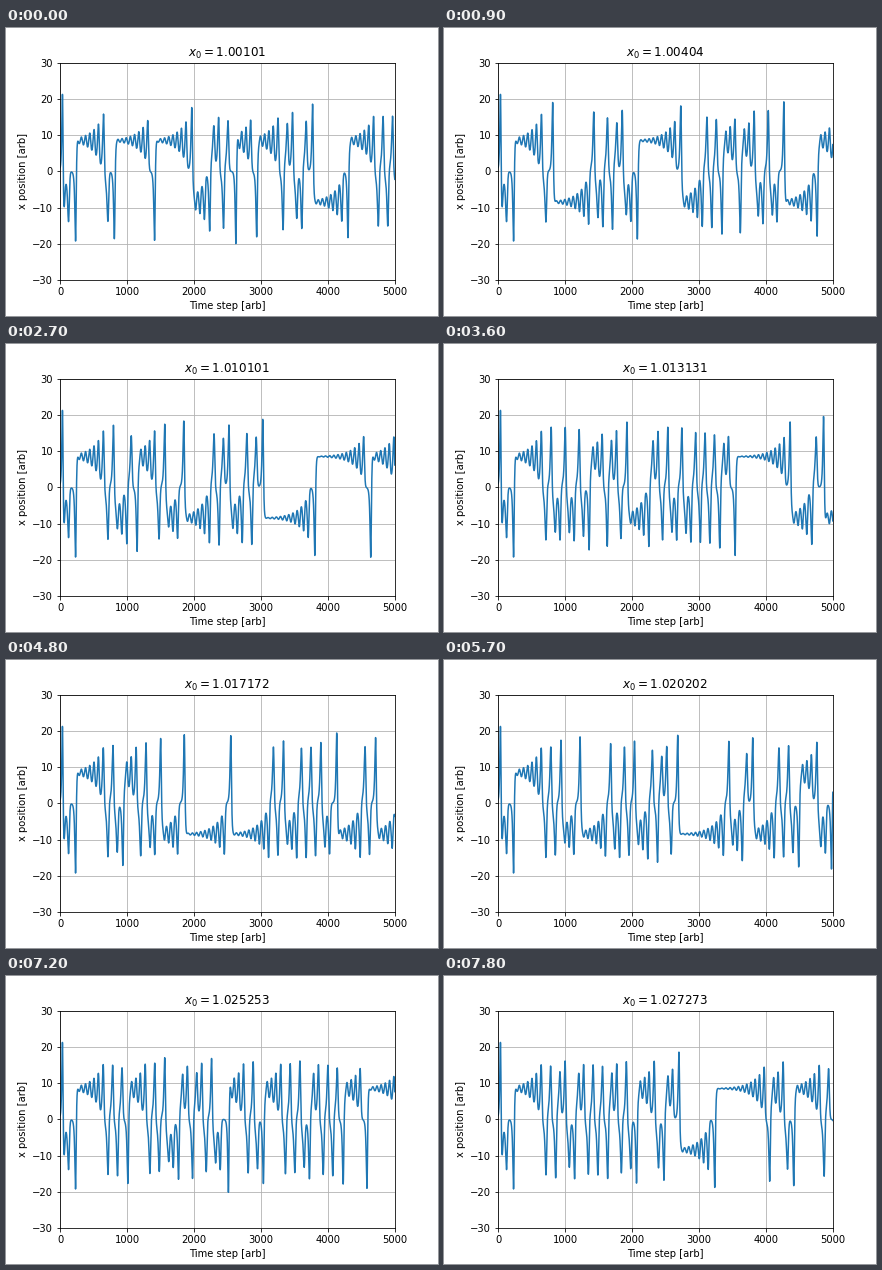
Recreate the animation shown at these times as a matplotlib script. Size 432x288 px, loop 8000 ms.

```python
import numpy as np
import matplotlib.pyplot as plt
from matplotlib.animation import FuncAnimation

SIGMA, RHO, BETA = 10, 28, 8 / 3
DT, STEPS = 0.01, 5000
INTERVAL, FRAMES, HOLD = 100, 80, 3


def lorenz_x(x0, y0=1.0, z0=1.0):
    """Forward-Euler x(t) of the Lorenz system, one column per start value."""
    xs = np.empty((STEPS + 1, len(x0)))
    x, y, z = x0, np.full_like(x0, y0), np.full_like(x0, z0)
    for i in range(STEPS + 1):
        xs[i] = x
        dx = SIGMA * (y - x)
        dy = x * (RHO - z) - y
        dz = x * y - BETA * z
        x, y, z = x + dx * DT, y + dy * DT, z + dz * DT
    return xs


starts = np.linspace(1, 1.1, 100)[1:28]
paths = lorenz_x(starts)

fig, ax = plt.subplots(figsize=(6, 4), dpi=72)
fig.subplots_adjust(left=0.125, right=0.9, bottom=0.125, top=0.88)
line, = ax.plot(paths[:, 0])
title = ax.set_title("")
ax.set(xlim=(0, STEPS), ylim=(-30, 30),
       xlabel="Time step [arb]", ylabel="x position [arb]")
ax.grid()


def update(frame):
    k = frame // HOLD
    line.set_ydata(paths[:, k])
    title.set_text(f"$x_0 = {round(starts[k], 6)}$")
    return line, title


anim = FuncAnimation(fig, update, frames=FRAMES, interval=INTERVAL,
                     repeat=True, repeat_delay=0, blit=False)
plt.show()
```
